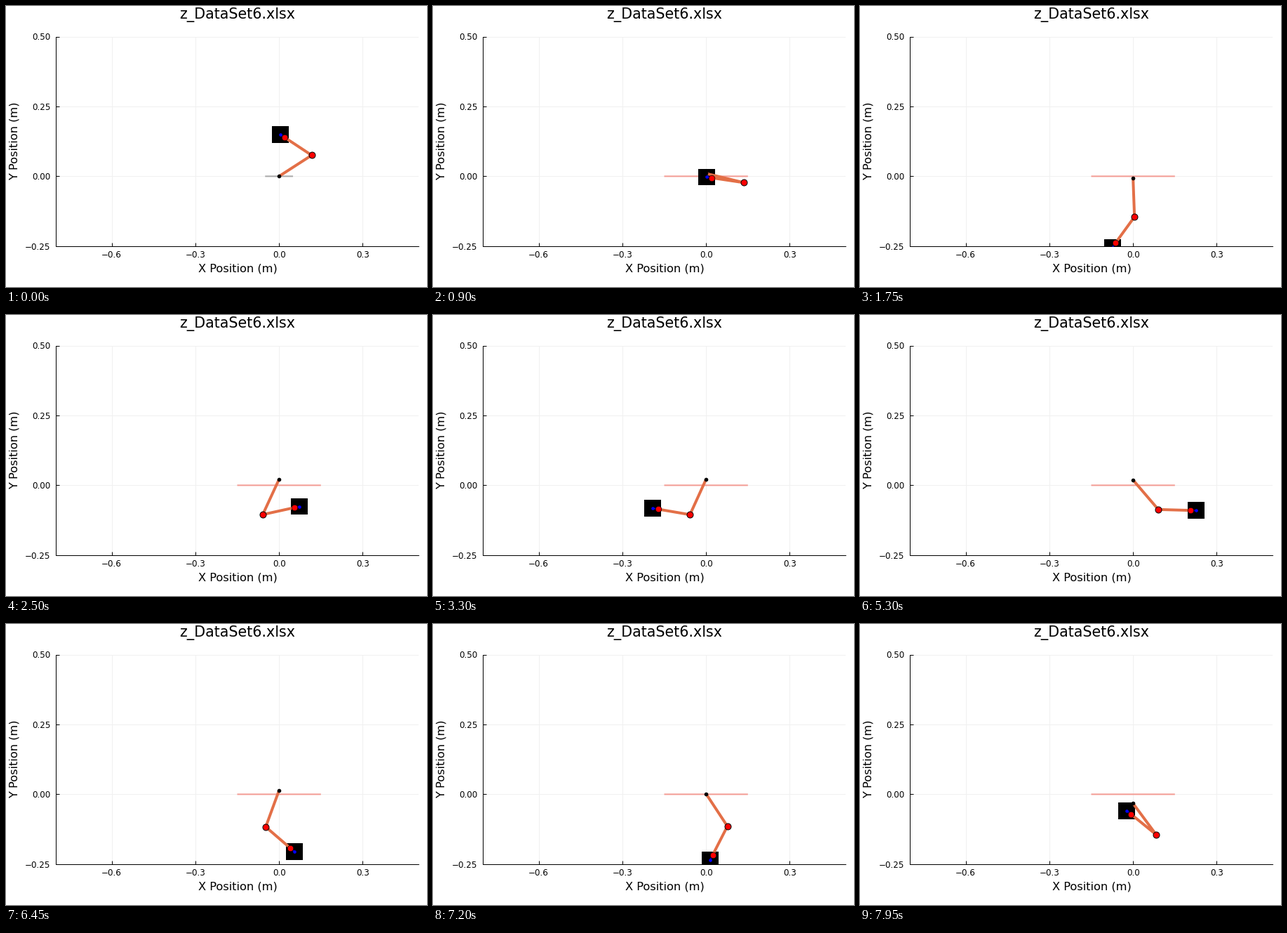
Write a matplotlib script that moves like this. It is 600 px wide and 400 px high and loops after 8 s.

```python
import numpy as np
import matplotlib.pyplot as plt
from matplotlib.animation import FuncAnimation
from matplotlib.patches import Rectangle

W, H, DPI = 600, 400, 100
FRAMES, STEP = 160, 50
PT = 72 / DPI                        # points per pixel
SCALE = 397.6                        # pixels per metre
L1, L2, LBOX = 0.139, 0.1157, 0.135  # link lengths and box distance, metres
BOX = 0.06

# key poses: time (s), upper and lower angle (degrees from straight down),
# drop of the sprung pivot (pixels)
POSES = np.array([
    (0, 122.8, -123.4, 0), (.85, 80, -101, -4), (1.3, 38, -64, -4),
    (1.75, 2.1, -36, 2.5), (2.2, -18, 48, -16), (2.8, -28, 158, -1),
    (3.3, -24.5, 260.3, -8.5), (3.6, -46, 322, 2), (4.45, 13.7, 364.2, 2.5),
    (5.15, 64, 428, -7), (5.3, 40.6, 448.4, -7.5), (6.1, -82, 424, -6),
    (6.45, -20.1, 409.2, -5.5), (7, 36, 358, 6), (7.5, 28.5, 291, -13),
    (7.95, 36.5, 230.8, 13)])


def ease(t, x, y):
    """Smooth curve through the keys that comes to rest at every turning point."""
    h = np.diff(x)
    d = np.diff(y) / h
    m = np.zeros(len(x))
    same = d[:-1] * d[1:] > 0
    m[1:-1][same] = 2 / (1 / d[:-1][same] + 1 / d[1:][same])
    m[-1] = d[-1]
    i = np.clip(np.searchsorted(x, t, side="right") - 1, 0, len(h) - 1)
    u = (t - x[i]) / h[i]
    return ((1 + 2 * u) * (1 - u) ** 2 * y[i] + u * (1 - u) ** 2 * h[i] * m[i]
            + u * u * (3 - 2 * u) * y[i + 1] + u * u * (u - 1) * h[i] * m[i + 1])


time = np.arange(FRAMES) * STEP / 1000
upper, lower, drop = (ease(time, POSES[:, 0], col) for col in POSES[:, 1:].T)

plt.rcParams["font.family"] = "DejaVu Sans"
fig = plt.figure(figsize=(W / DPI, H / DPI), dpi=DPI, facecolor="white")
left, right, top, bottom = 71, 588, 43.6, 341.8
ax = fig.add_axes([left / W, 1 - bottom / H, (right - left) / W, (bottom - top) / H])
ax.set(xlim=(-0.8, 0.5), ylim=(-0.25, 0.5))
x_ticks = [-0.6, -0.3, 0, 0.3]
y_ticks = [-0.25, 0, 0.25, 0.5]
ax.set_xticks(x_ticks, labels=[])
ax.set_yticks(y_ticks, labels=[])
ax.tick_params(direction="in", length=5 * PT, width=PT)
ax.grid(color="#f0f0f0", linewidth=PT)
ax.set_axisbelow(True)
for side in ("top", "right"):
    ax.spines[side].set_visible(False)
for side in ("left", "bottom"):
    ax.spines[side].set_linewidth(PT)


def label(x, y, text, px, **kw):
    kw = {"ha": "center", "va": "baseline", **kw}
    fig.text(x / W, 1 - y / H, text, fontsize=px * PT, **kw)


label(329.3, 18.3, "z_DataSet6.xlsx", 20.7)
label(330, 378.2, "X Position (m)", 16.3)
label(20, 192.7, "Y Position (m)", 16.3, rotation=90, ha="right", va="center")
for v in x_ticks:
    label(389.2 + v * SCALE, 358.3, f"{v:.1f}".replace("-", "−"), 11.85)
for v in y_ticks:
    label(63.3, 247.2 - v * SCALE, f"{v:.2f}".replace("-", "−"), 11.85, ha="right")


def line(color, px, z):
    return ax.plot([], [], color=color, lw=px * PT, zorder=z,
                   solid_capstyle="butt", snap=False)[0]


def dot(color, px, z, edge=0.0):
    return ax.plot([], [], "o", color=color, ms=px * PT, zorder=z,
                   mec="black", mew=edge * PT, snap=False)[0]


rail = line("#f39c94", 2, 3)
box = ax.add_patch(Rectangle((0, 0), BOX, BOX, fc="black", lw=0, zorder=4))
links = line("#e36f47", 4, 5)
arm = line("#0000b0", 2, 5)
tip = dot("blue", 4.6, 6)
pivot = dot("black", 5.6, 7)
elbow = dot("red", 9, 7, 1)
joint = dot("red", 8.6, 7, 0.7)


def heading(degrees):
    a = np.radians(degrees)
    return np.array([np.sin(a), -np.cos(a)])


def draw(i):
    half = 0.15 if i else 0.05
    rail.set_data([-half, half], [0, 0])
    rail.set_color("#f39c94" if i else "#a9a9a9")

    p = np.array([0, -drop[i] / SCALE])
    e = p + L1 * heading(upper[i])
    d = heading(lower[i])
    j, b = e + L2 * d, e + LBOX * d

    box.set_xy(b - BOX / 2)
    links.set_data(*np.array([p, e, j]).T)
    arm.set_data(*np.array([j, b]).T)
    for mark, at in ((tip, b), (pivot, p), (elbow, e), (joint, j)):
        mark.set_data([at[0]], [at[1]])
    return rail, box, links, arm, tip, pivot, elbow, joint


anim = FuncAnimation(fig, draw, frames=FRAMES, interval=STEP, repeat=True, repeat_delay=0)
plt.show()
```
